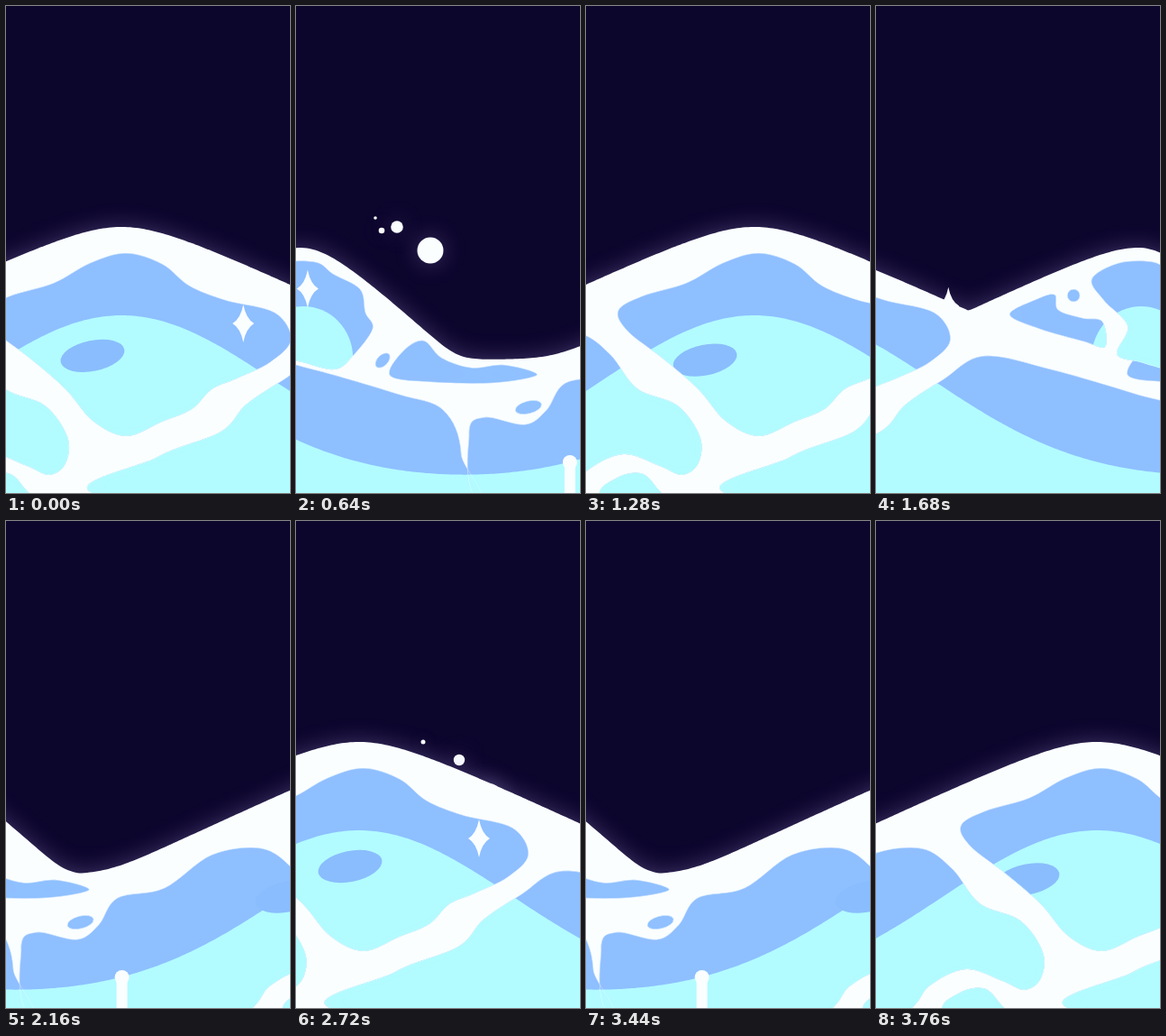
An HTML page with a canvas that plays this animation: 315x540 px, repeating every 3840 ms.

```html
<!DOCTYPE html>
<html lang="en">
<head>
<meta charset="utf-8">
<title>Waves</title>
<style>
  html, body { margin: 0; height: 100%; overflow: hidden; background: #0c052c; }
  canvas { display: block; }
</style>
</head>
<body>
<canvas id="stage" width="315" height="540"></canvas>
<script>
const ctx = document.getElementById('stage').getContext('2d');
const W = 315, H = 540, STEP = 80, CYCLE = 1280, LOOP = 3840;
const NIGHT = '#0c052c', WHITE = '#fafeff', BLUE = '#8ebfff', CYAN = '#b2fbff', SPOT = '#8abdfd';

// Each wave is a broad swell followed by a steeper breaker; x positions by age in ms.
const swellX = age => 245 - .73 * (age - 1200);
const breakerX = age => 344 * Math.exp((1760 - age) / 256) - 179;
const sparkleX = age => 272 * Math.exp((1440 - age) / 400) - 69;

const hill = (d, slope, round) => slope * (Math.hypot(d, round) - round);

// Upper edge of the water: the highest hill, blended softly into the trough.
function surfaceY(x, ages) {
  const tops = ages.flatMap(age => {
    const d = x - breakerX(age);
    const sink = .08 * Math.max(0, age - 1440);
    return [245 + sink + hill(x - swellX(age), .47, 60), 268 + hill(d, d < 0 ? .47 : .92, 45)];
  });
  const soft = 8, floor = 392;
  return floor - soft * Math.log(1 + Math.exp((floor - Math.min(...tops)) / soft));
}

const deepY = (x, ages) =>
  ages.reduce((y, age) => y - 185 * Math.exp(-(((x - swellX(age)) / 240) ** 2)), 528);

// Openings in the foam, as x, y pairs; x counts from the crest they ride on.
const swellCells = [
  [-151, 338, -125, 322, -75, 307, -35, 285, 5, 274, 45, 286, 75, 310, 115, 326, 170, 340, 188, 370,
    165, 395, 128, 413, 100, 425, 78, 447, 45, 461, 5, 477, -32, 460, -62, 425, -100, 392, -140, 361],
  [-462, 475, -445, 456, -400, 464, -376, 448, -355, 418, -303, 407, -250, 370, -195, 363, -160, 386,
    -130, 424, -85, 443, -60, 478, -62, 507, -80, 520, -105, 510, -145, 497, -185, 515, -210, 545, -300, 620, -445, 560],
  [-172, 545, -152, 523, -126, 518, -109, 533, -95, 560, -140, 600],
  [-15, 545, 40, 500, 110, 472, 138, 442, 180, 414, 225, 388, 300, 403, 393, 430, 444, 448, 464, 497, 452, 580],
  [385, 410, 399, 383, 422, 371, 442, 390, 475, 401, 512, 398, 548, 409, 500, 418, 430, 417]
];
const breakerCells = [
  [-52, 303, -22, 285, 17, 284, 36, 297, 66, 314, 72, 340, 80, 358, 58, 388, 38, 403, 2, 395, -24, 386, -12, 355, -38, 327],
  [-143, 342, -113, 325, -93, 320, -89, 337, -62, 346, -40, 350, -37, 378, -61, 372, -110, 358]
];

// Small drops as x, y, radius, flying in an arc around the given moment.
const sprays = [
  { at: 640, from: -160, to: 160, drops: [[88, 235, 1.8], [95, 249, 3.3], [112, 245, 6.8], [149, 271, 14.5]] },
  { at: 160, from: 0, to: 80, drops: [[141, 245, 2.5], [181, 265, 6.2], [214, 305, 14]] }
];

function fill(path, color) {
  ctx.fillStyle = color;
  ctx.fill(path);
}

function ellipse(x, y, rx, ry, tilt = 0) {
  const path = new Path2D();
  path.ellipse(x, y, rx, ry, tilt, 0, 7);
  return path;
}

// Everything below the line y = f(x).
function below(f, ages) {
  const path = new Path2D();
  path.moveTo(-60, 600);
  for (let x = -60; x <= W + 60; x += 3) path.lineTo(x, f(x, ages));
  path.lineTo(W + 60, 600);
  return path;
}

// Smooth closed outline through the points, moved by dx.
function blob(coords, dx) {
  const path = new Path2D(), n = coords.length / 2;
  const at = i => [coords[i % n * 2] + dx, coords[i % n * 2 + 1]];
  path.moveTo(...at(0));
  for (let i = 0; i < n; i++) {
    const [a, b, c, d] = [at(i + n - 1), at(i), at(i + 1), at(i + 2)];
    path.bezierCurveTo(b[0] + (c[0] - a[0]) / 6, b[1] + (c[1] - a[1]) / 6,
      c[0] - (d[0] - b[0]) / 6, c[1] - (d[1] - b[1]) / 6, ...c);
  }
  return path;
}

// Paints the water seen through the openings, with light spilling in from the foam.
function inside(paths, paint) {
  const holes = new Path2D();
  paths.forEach(p => holes.addPath(p));
  ctx.save();
  ctx.clip(holes);
  ctx.fillStyle = BLUE;
  ctx.fillRect(0, 0, W, H);
  paint();
  ctx.restore();
  for (const p of paths) {
    ctx.save();
    ctx.clip(p);
    ctx.shadowColor = 'rgba(250, 254, 255, .5)';
    ctx.shadowBlur = 16;
    ctx.strokeStyle = 'rgba(250, 254, 255, .6)';
    ctx.stroke(p);
    ctx.restore();
  }
}

function drawSpray({ at, from, to, drops }, phase) {
  const t = phase - at;
  if (t < from || t > to) return;
  for (const [x, y, r] of drops)
    fill(ellipse(x - 1.27 * t, y - .3 * t + .0018 * t * t, r, r), WHITE);
}

function drawSparkle(age) {
  const x = sparkleX(age), y = 352 - .08 * Math.max(0, age - 1440), w = 12, h = 21;
  const star = new Path2D();
  star.moveTo(x, y - h);
  for (const [sx, sy, ex, ey] of [[1, -1, 1, 0], [1, 1, 0, 1], [-1, 1, -1, 0], [-1, -1, 0, -1]])
    star.quadraticCurveTo(x + sx * w * .25, y + sy * h * .25, x + ex * w, y + ey * h);
  fill(star, WHITE);
}

function drawSpot(age) {
  const left = 1440 - age;
  fill(ellipse(60 + .45 * left, 383 + .06 * left, 36, 17, -.2), SPOT);
}

function drawDrip(age) {
  const x = swellX(age) - 350;
  fill(ellipse(x, 506, 8, 8), WHITE);
  ctx.fillRect(x - 6, 506, 12, 60);
}

function draw(phase) {
  const ages = [phase + CYCLE, phase];
  ctx.fillStyle = NIGHT;
  ctx.fillRect(0, 0, W, H);

  ctx.shadowColor = 'rgba(185, 165, 235, .32)';
  ctx.shadowBlur = 26;
  sprays.forEach(s => drawSpray(s, phase));
  fill(below(surfaceY, ages), WHITE);
  ctx.shadowBlur = 0;

  const onSwell = ages.flatMap(a => [
    ...swellCells.map(c => blob(c, swellX(a))),
    ellipse(swellX(a) - 396, 445, 15, 7, -.25)
  ]);
  inside(onSwell, () => {
    fill(below(deepY, ages), CYAN);
    ages.forEach(drawSpot);
  });

  const onBreaker = ages.flatMap(a => [
    ...breakerCells.map(c => blob(c, breakerX(a))),
    ellipse(breakerX(a) - 72, 321, 7, 7),
    ellipse(breakerX(a) + 91, 393, 10, 6, -.8)
  ]);
  inside(onBreaker, () => ages.forEach(a => fill(ellipse(breakerX(a) + 3, 390, 55, 57), CYAN)));

  ages.forEach(drawDrip);
  ages.forEach(drawSparkle);
}

function tick() {
  // The opening drawing is held for two steps.
  const step = Math.max(1, Math.floor(performance.now() % LOOP / STEP));
  draw(step * STEP % CYCLE);
  requestAnimationFrame(tick);
}
tick();
</script>
</body>
</html>
```
